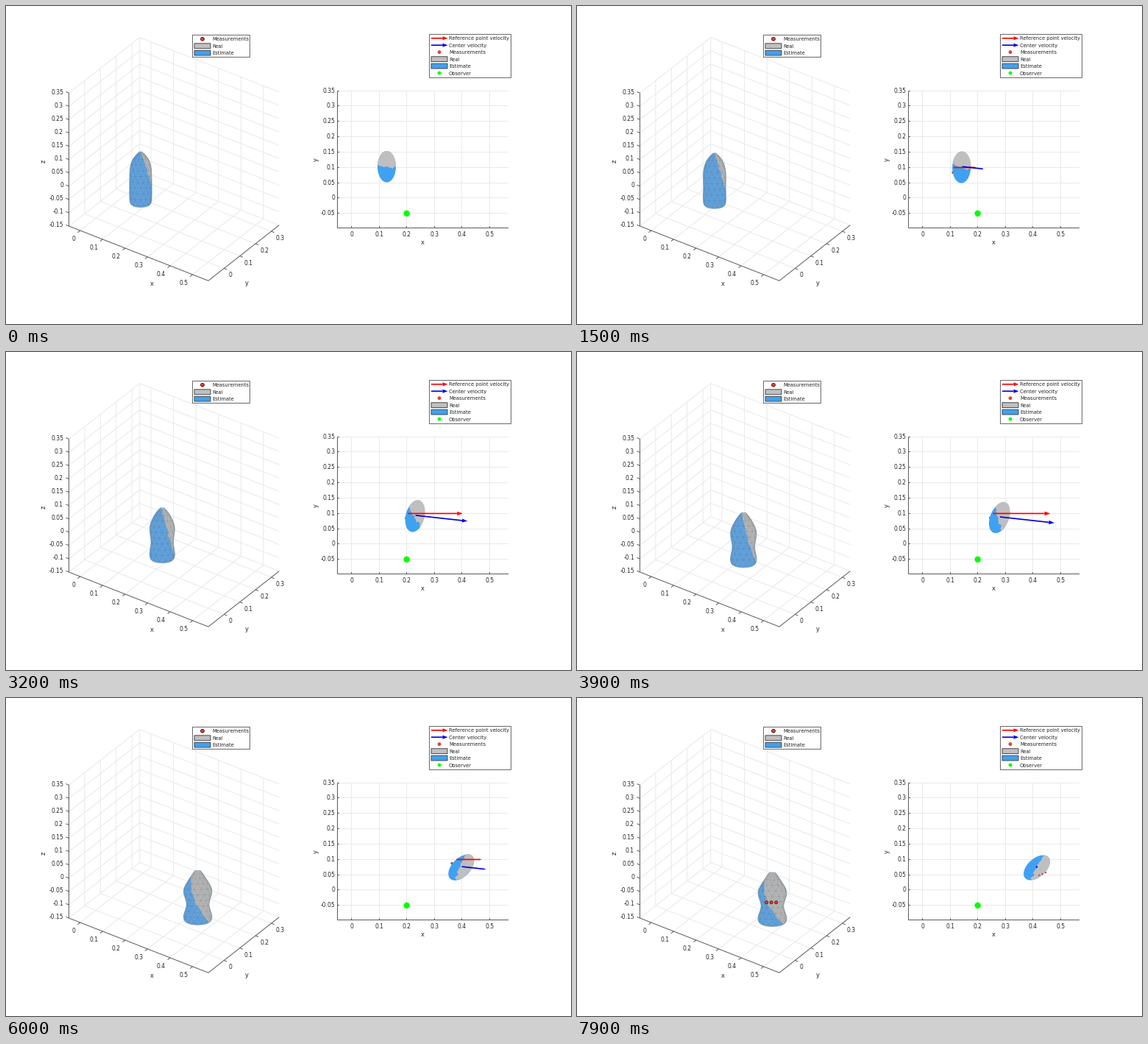
Recreate the animation shown at these times as a matplotlib script. Size 768x432 px, loop 8000 ms.

```python
import numpy as np
import matplotlib.pyplot as plt
from matplotlib.animation import FuncAnimation
from matplotlib.collections import LineCollection
from matplotlib.patches import Circle, Polygon, Rectangle

W, H, DPI = 768, 432, 100
STEP, FRAMES = 100, 80
PT = 72 / DPI
INK, AXIS, GRID = "#262626", "#5c5c5c", "#e9e9e9"
GRAY, BLUE, RED, NAVY = "#c0c0c0", "#3fa1f1", "#ff0000", "#0000e6"
DOT, GREEN = "#e8402c", "#00ff00"

plt.rcParams["font.family"] = "DejaVu Sans"
fig = plt.figure(figsize=(W / DPI, H / DPI), dpi=DPI, facecolor="white")
ax = fig.add_axes([0, 0, 1, 1])
ax.set_xlim(0, W)
ax.set_ylim(H, 0)
ax.axis("off")


def line(p, q, color=AXIS, z=1):
    ax.plot([p[0], q[0]], [p[1], q[1]], color=color, lw=PT, zorder=z,
            snap=False, solid_capstyle="butt")


def text(x, y, s, px=7.7, ha="center", rot=0):
    ax.text(x, y + 0.1 * px, s, fontsize=px * PT, ha=ha, va="center",
            rotation=rot, color=INK, zorder=21)


def dot(x, y, r, color, edge="none", z=8):
    return ax.add_patch(Circle((x, y), r, fc=color, ec=edge, lw=0.8 * PT, zorder=z))


def box(x, y, w, h, color, edge, z):
    ax.add_patch(Rectangle((x, y), w, h, fc=color, ec=edge, lw=PT, zorder=z,
                           snap=False))


def shape(color, z, **style):
    return ax.add_patch(Polygon([(0, 0), (1, 0), (0, 1)], fc=color, zorder=z, **style))


class Arrow:
    def __init__(self, color, z=10):
        self.shaft, = ax.plot([], [], color=color, lw=1.7 * PT, zorder=z,
                              snap=False, solid_capstyle="butt")
        self.head = shape(color, z)

    def put(self, start, vec, head=None):
        start, vec = np.array(start, float), np.array(vec, float)
        n = np.hypot(*vec)
        self.shaft.set_visible(n > 0.5)
        self.head.set_visible(n > 0.5)
        if n <= 0.5:
            return
        d = vec / n
        side = np.array([-d[1], d[0]])
        size = head or 0.1 * n
        tip = start + vec
        neck = tip - d * size
        self.shaft.set_data([start[0], neck[0]], [start[1], neck[1]])
        wide = max(0.36 * size, 1.2)
        self.head.set_xy([tip, neck + side * wide, neck - side * wide])


# ---- fixed parts ----
X0, X1, Y0, Y1, Z0, Z1 = -0.05, 0.57, -0.1, 0.35, -0.15, 0.35


def project(x, y, z):
    u, v, w = (x - X0) / (X1 - X0), (y - Y0) / (Y1 - Y0), (z - Z0) / (Z1 - Z0)
    return 85.5 + 189.5 * u + 96.3 * v, 299 + 74.2 * u - 75.5 * v - 180.8 * w


def axes3d():
    for x in np.arange(6) / 10:
        line(project(x, Y0, Z0), project(x, Y1, Z0), GRID)
        line(project(x, Y1, Z0), project(x, Y1, Z1), GRID)
        a, b = project(x, Y0, Z0)
        line((a, b), (a - 3.4, b + 2.7))
        text(a - 6, b + 11, f"{x:g}", ha="right")
    for y in np.arange(4) / 10:
        line(project(X0, y, Z0), project(X1, y, Z0), GRID)
        line(project(X0, y, Z0), project(X0, y, Z1), GRID)
        a, b = project(X1, y, Z0)
        line((a, b), (a + 4, b + 1.6))
        text(a + 6, b + 8.6, f"{y:g}", ha="left")
    for z in np.arange(-3, 8) / 20:
        line(project(X0, Y0, z), project(X0, Y1, z), GRID)
        line(project(X0, Y1, z), project(X1, Y1, z), GRID)
        a, b = project(X0, Y0, z)
        line((a, b), (a - 4, b - 1.6))
        text(a - 7.5, b - 1.8, f"{z:g}", ha="right")
    line(project(X0, Y1, Z0), project(X0, Y1, Z1), GRID)
    line(project(X0, Y0, Z0), project(X0, Y0, Z1))
    line(project(X0, Y0, Z0), project(X1, Y0, Z0))
    line(project(X1, Y0, Z0), project(X1, Y1, Z0))
    text(198.5, 376.5, "x", 8.3)
    text(327.5, 376, "y", 8.3)
    text(51, 210, "z", 8.3, rot=90)


def axes2d():
    left, right, top, bottom = 450.5, 683, 115.5, 301.5
    for k in range(6):
        x = np.floor(469.5 + 37.5 * k) + 0.5
        line((x, top), (x, bottom), GRID)
        line((x, bottom), (x, bottom - 2.5))
        text(x, 310, f"{k / 10:g}")
    for k in range(9):
        y = np.floor(115 + 20.85 * k) + 0.5
        line((left, y), (right, y), GRID)
        line((left, y), (left + 2.5, y))
        text(447.5, y - 0.3, f"{round(0.35 - k / 20, 2):g}", ha="right")
    line((left, top), (left, bottom))
    line((left, bottom), (right, bottom))
    text(566, 321, "x", 8.3)
    text(421, 208, "y", 8.3, rot=90)
    dot(544.7, 281.8, 4.2, GREEN)


def legend(x, y, w, h, entries):
    """Box with one row per (label, kind, colour)."""
    box(x, y, w, h, "white", "#6a6a6a", 19)
    for k, (label, kind, color) in enumerate(entries):
        row = y + 5.3 + 9.45 * k
        if kind == "arrow":
            Arrow(color, 20).put((x + 2.5, row), (22.5, 0), 7)
        elif kind == "patch":
            box(x + 2.5, row - 3.4, 22, 6.8, color, "#4a4a4a", 20)
        else:
            dot(x + 13.5, row, 2.4, color, kind, 20)
        text(x + 26.5, row, label, 6.8, "left")


surfaces = [("Real", "patch", GRAY), ("Estimate", "patch", BLUE)]
axes3d()
axes2d()
legend(253.5, 39.5, 78, 30, [("Measurements", "#301010", DOT)] + surfaces)
legend(575.5, 38.5, 111, 59,
       [("Reference point velocity", "arrow", RED), ("Center velocity", "arrow", NAVY),
        ("Measurements", "none", DOT)] + surfaces + [("Observer", "none", GREEN)])

# ---- moving parts ----
JAG = np.random.default_rng(4).uniform(-1.3, 1.3, (16, 2))
U = np.linspace(0, 1, 16)


def half_width(v, s):
    """Body half width at depth v below its top; waist grows with the turn s."""
    base = 15.2 * np.tanh((v + 0.02) / 0.18)
    bulge = 2.4 + 2.2 * np.cos(4 * np.pi * (v - 0.37))
    return (base + s ** 0.75 * bulge) * np.sqrt(1 - v ** 24)


def outline(cx, top, height, s):
    v = np.append(np.linspace(0, 0.9, 30), np.linspace(0.91, 1, 16))
    w, y = half_width(v, s), top + height * v
    return np.vstack([np.column_stack([cx - w, y]),
                      np.column_stack([cx + w, y])[::-1]])


def mesh(cx, top, height, s, rows=10, cols=7):
    """Edges of a staggered triangle net over the body."""
    net = []
    for j in range(rows):
        v = (j + 0.3) / rows
        u = np.sin(np.pi * (np.arange(cols) / (cols - 1) - 0.5 + j % 2 / 12))
        y = top + height * v + 3 * v * np.sqrt(1 - u * u)
        net.append(np.column_stack([cx + half_width(v, s) * u, y]))
    segs = []
    for j, (a, b) in enumerate(zip(net, net[1:])):
        p, q = (a, b) if j % 2 else (b, a)
        segs += [*zip(a, b), *zip(p, q[1:]), *zip(b, b[1:])]
    return segs


def seam3d(s):
    """Diagonal seam that sinks and bows left; closed around the right."""
    x = -9 * s * s * (1 - U) + 17 * U - 12 * s ** 3 * np.sin(np.pi * U) - 1
    y = (47 + 25 * np.sqrt(s)) * U
    p = np.column_stack([x, y]) + JAG
    return np.vstack([p, (20, p[-1, 1]), (40, 60), (40, -20), (p[0, 0], -20)])


def rotate(p, deg):
    c, s = np.cos(np.radians(deg)), np.sin(np.radians(deg))
    return p @ np.array([[c, s], [-s, c]])


def ellipse(a, b, deg):
    q = np.linspace(0, 2 * np.pi, 48)
    return rotate(np.column_stack([a * np.cos(q), b * np.sin(q)]), deg)


def seam2d(deg, shift):
    """Half plane with a ragged edge, facing deg clockwise from up."""
    p = np.column_stack([44 * U - 22, 0 * U + shift]) + 1.6 * JAG
    return rotate(np.vstack([p, (40, -40), (-40, -40)]), deg)


body = shape("#62a1da", 4)
real3d = shape("#b4b4b4", 5)
real3d.set_clip_path(body)
net = LineCollection([], colors="#27394a", linewidths=0.6 * PT, alpha=0.14, zorder=6)
ax.add_collection(net)
net.set_clip_path(body)
rim = shape("none", 7, ec="#6f8798", lw=0.9 * PT, alpha=0.6)

side_hit = dot(0, 0, 1.8, "#9a5048", z=3)
est2d = shape(BLUE, 4)
full2d = shape("none", 4)
real2d = shape("#bfbfbf", 5)
real2d.set_clip_path(full2d)
ref_arrow, center_arrow = Arrow(RED), Arrow(NAVY, 11)

late = [dot(625, 229.5, 1.2, NAVY)]
for k in range(3):
    late.append(dot(257.6 + 6.6 * k, 277.7, 2, DOT, "#501010"))
    late.append(dot(628 + 4.5 * k, 240.8 - 1.8 * k, 1.2, DOT))


def update(i):
    t = i * STEP / 1000
    phase = np.pi * (np.clip(t, 0.6, 7.0) - 0.6) / 6.4
    s = (1 - np.cos(phase)) / 2
    drift = max(np.sin(phase), 0)
    speed = drift ** 1.1

    # perspective view
    cx, top, height = 183 + 82.5 * s, 198 + 39 * s, 75.5 - 2 * s
    edge = outline(cx, top, height, s)
    body.set_xy(edge)
    rim.set_xy(edge)
    real3d.set_xy(seam3d(s) + (cx, top))
    net.set_segments(mesh(cx, top, height, s))

    # top view
    cx, cy = 517.5 + 107.5 * s, 218.3 + 12.2 * s
    turn = 48 * s ** 1.3
    est2d.set_xy(ellipse(12.5, 21.3, turn) + (cx, cy + drift))
    full2d.set_xy(ellipse(12.5, 21.3, turn) + (cx + drift, cy - 0.7 * drift))
    real2d.set_xy(seam2d(5 + 110 * s ** 0.75, 3 * s * drift) + (cx, cy))
    side_hit.center = cx - 11.5 - s, cy + 8 - 14 * s
    side_hit.set_visible(drift > 0.1)
    ref_arrow.put((cx - 11 + 5 * s, 219.4), (78 * speed, 0))
    center_arrow.put((cx + 1, cy - 0.7), (74 * speed, 8.2 * speed))

    for d in late:
        d.set_visible(t >= 7.2)
    return []


anim = FuncAnimation(fig, update, frames=FRAMES, interval=STEP, repeat=True,
                     repeat_delay=0, init_func=lambda: update(0))
plt.show()
```
